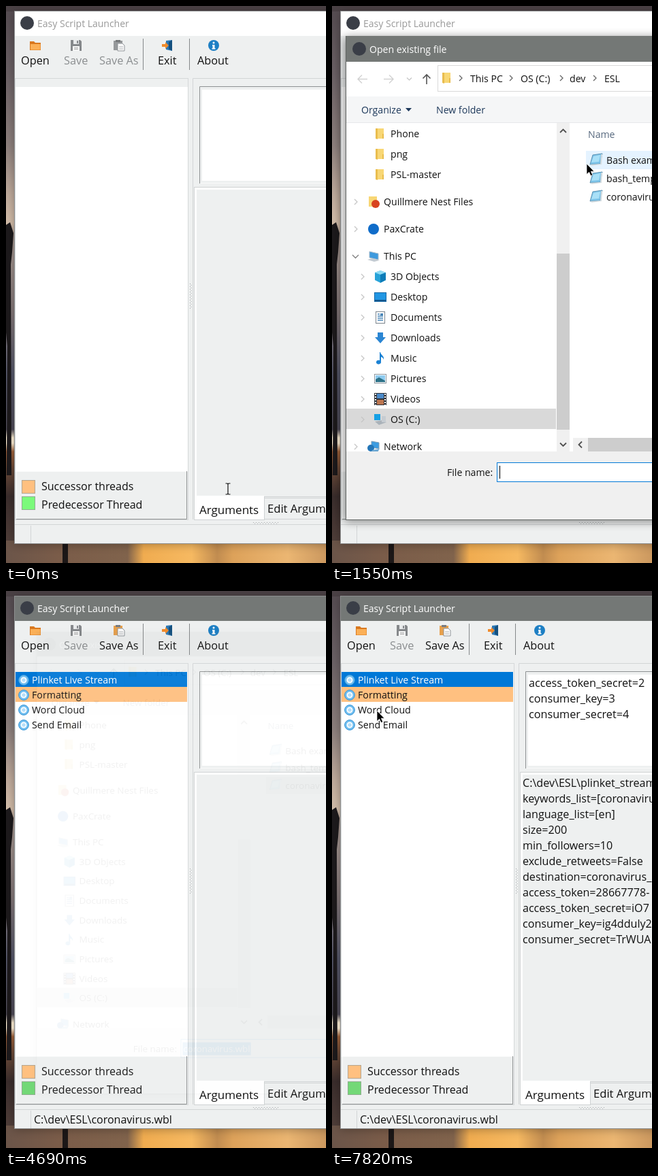
Animation, 470 px wide and 819 px high, one loop 7.99 s. Source, as an HTML page:

```html
<!DOCTYPE html>
<html lang="en">
<head>
<meta charset="utf-8">
<title>Script launcher</title>
<style>
  html, body { margin: 0; width: 100%; height: 100%; overflow: hidden; background: #3b3433; }
  svg { display: block; width: 470px; height: 819px; font-family: "Open Sans", "Noto Sans", sans-serif; }
</style>
</head>
<body>
<svg id="stage" viewBox="0 0 470 819"></svg>
<script>
const LOOP = 7990;
const OPEN_START = 1080, OPEN_DONE = 1230, PICK = 2650, CONFIRM = 4540, LOADED = 4690, CLOSED = 4860, SHOW_ARGS = 6420;

// Markup helpers
const rect = (x, y, w, h, fill, extra = '') => `<rect x="${x}" y="${y}" width="${w}" height="${h}" fill="${fill}" ${extra}/>`;
const box = (x, y, w, h, fill, stroke, extra = '') => rect(x + .5, y + .5, w - 1, h - 1, fill, `stroke="${stroke}" ${extra}`);
const text = (x, y, str, size = 16, fill = '#111', extra = '') => `<text x="${x}" y="${y}" font-size="${size}" fill="${fill}" ${extra}>${str}</text>`;
const path = (d, fill, extra = '') => `<path d="${d}" fill="${fill}" ${extra}/>`;
const line = (d, stroke, width = 1, extra = '') => path(d, 'none', `stroke="${stroke}" stroke-width="${width}" ${extra}`);
const disc = (x, y, r, fill, extra = '') => `<circle cx="${x}" cy="${y}" r="${r}" fill="${fill}" ${extra}/>`;
const group = (id, body, extra = '') => `<g id="${id}" ${extra}>${body}</g>`;
const at = (x, y, body) => `<g transform="translate(${x} ${y})">${body}</g>`;
const gradient = (id, attrs, stops) => `<linearGradient id="${id}" ${attrs}>` +
  stops.map(([offset, color]) => `<stop offset="${offset}" stop-color="${color}"/>`).join('') + '</linearGradient>';

// Icons are centred on 0,0
const floppy = path('M-8 -8H6L8 -6V8H-8Z', '#85888b') + rect(-4, -8, 8, 6, '#e8eaeb') + rect(1, -7, 2, 4, '#85888b') + rect(-5, 1, 10, 7, '#f4f5f5') + line('M-3 3.5H3M-3 5.5H3', '#aaa');
const paste = (board, clip) => rect(-8, -7, 13, 14, board) + rect(-5, -8, 7, 3, clip) + path('M-2 -3H5L8 0V8H-2Z', '#fafafa', 'stroke="#909599"') + line('M0 2H6M0 5H6', '#b0b4b8');
const icons = {
  open: path('M-8 -6H-2L0 -4H8V7H-8Z', '#d9781f') + path('M-7 -2H7.5V6.5H-7Z', '#fbb057'),
  exit: path('M-2 -7L7 -8V8L-2 6Z', '#2b78b5') + path('M2 -5L7 -8V8L2 5Z', '#14507f') + path('M-8 -2H-3V-5L2 0L-3 5V2H-8Z', '#f08b2c'),
  about: disc(0, 0, 8, '#1d7fc4') + disc(0, -4, 1.5, '#fff') + path('M-2 -1H1.5V4H2.5V5.5H-2.5V4H-1.5V.5H-2Z', '#fff'),
  thread: disc(0, 0, 7.4, '#72bff0', 'stroke="#3795d6"') + disc(0, 0, 3.6, '#b5def8', 'stroke="#fff" stroke-width="1.8"'),
  folder: path('M-6 -8H6V7H-6Z', '#f8d775') + path('M-6 -8H-3V8L-6 7Z', '#e9bd4e') + rect(4, 0, 2, 7, '#e9bd4e'),
  sync: path('M-7 -8H5V7H-7Z', '#f8d775') + disc(3, 3, 6, '#d8431f'),
  cloud: disc(0, 0, 8, '#0f6cc9'),
  pc: path('M-6 -7L7 -4V5L-6 2Z', '#3e9ade', 'stroke="#a9bccb"') + path('M-9 5L-2 3L9 6L1 8Z', '#c3cbd2'),
  cube: path('M0 -9L8 -6V5L0 9L-8 5V-6Z', '#28a3d9') + path('M0 -9L8 -6L0 -3L-8 -6Z', '#90dcf5') + path('M0 -3L8 -6V5L0 9Z', '#0d7cb8'),
  desktop: box(-9, -7, 18, 14, '#2196e3', '#1768a6') + rect(-8, 4, 16, 2, '#14578c'),
  doc: box(-7, -9, 14, 18, '#fff', '#7d868e') + line('M-4 -5H-1M-4 -2H4M-4 1H4M-4 4H4', '#4a86b8', 1.4) + rect(0, -6, 4, 3, '#4a86b8'),
  down: path('M-4 -8H4V-1H8L0 8L-8 -1H-4Z', '#2b86d3'),
  music: path('M0 -9C1 -4 6 -4 5 2C4 -1 2 -2 1 -2V5A3.6 3 0 1 1 -1 3V-9Z', '#1b82d4'),
  picture: box(-9, -7, 18, 14, '#fff', '#8a949c') + rect(-7, -5, 14, 10, '#8ecbf0') + path('M-7 5V1L-2 -2L7 3V5Z', '#2c7187'),
  video: rect(-9, -9, 18, 18, '#30343b') + rect(-5, -8, 10, 7, '#4b8ac9') + rect(-5, 1, 10, 7, '#bc7650') + line('M-7 -8V9M7 -8V9', '#fff', 2, 'stroke-dasharray="2 2"'),
  drive: rect(-9, -8, 9, 9, '#16a0e4') + path('M-8 3L3 1L9 4L-2 8Z', '#aab2b9') + path('M2 -5H8V4H2Z', '#c6ccd1'),
  network: path('M-3 -8L8 -6V3L-3 1Z', '#3c9ce1', 'stroke="#7f9db5"') + disc(-4, 2, 5, '#2476b8') + path('M-2 5L9 3L6 8H-3Z', '#6fa9d3'),
  note: path('M-5 -7L9 -9L6 6L-9 7Z', '#7cc3e8', 'stroke="#5d93b3"') + path('M-4 -5L6 -7L4 3L-7 4Z', '#a9e0f7') + path('M7 -8L9 -8L8 7L-7 9L-8 7L6 6Z', '#d5dde1'),
};

const scenery = () => `<defs>` +
  gradient('sky', 'x1="0" x2="0" y1="0" y2="1"', [[0, '#544b50'], [.12, '#6a6064'], [.25, '#8d807d'], [.34, '#c0ab9c'], [.39, '#d3bda9'], [.42, '#a99a93'], [.55, '#85797a'], [.66, '#56586b'], [.76, '#4f4b58'], [.775, '#fff0d6'], [.785, '#fff0d6'], [.8, '#a0623b'], [.83, '#6b4a38'], [.88, '#3a2d2c'], [1, '#5a4740']]) +
  gradient('shore', '', [[0, '#6b5549'], [.16, '#7a5c49'], [.38, '#80634c'], [.43, '#f0ac50'], [.58, '#f6b961'], [.66, '#c18c50'], [.71, '#dda25a'], [.88, '#ebb672'], [1, '#cb985f']]) +
  `<filter id="blur" x="-20%" y="-20%" width="140%" height="140%"><feGaussianBlur stdDeviation="7"/></filter></defs>` +
  rect(0, 0, 470, 819, 'url(#sky)') + rect(0, 0, 470, 8, '#4a4145') +
  path('M0 322L6 318L11 334L9 362L7 380L8 690H1L2 500L0 480Z', '#1d1a1c') +
  rect(0, 786, 470, 33, 'url(#shore)') + rect(83, 786, 8, 33, '#1c1717') +
  rect(12, 10, 600, 782, '#000', 'opacity=".3" filter="url(#blur)"');

const toolLabel = (x, label, fill) => text(x, 86, label, 16.3, fill);
const GREY = '#8b8e90';
const TASKS = ['Plinket Live Stream', 'Formatting', 'Word Cloud', 'Send Email'];
const EDITED = ['access_token_secret=2', 'consumer_key=3', 'consumer_secret=4'];
const ARGS = [String.raw`C:\dev\ESL\plinket_stream.py`, 'keywords_list=[coronavirus', 'language_list=[en]', 'size=200', 'min_followers=10',
  'exclude_retweets=False', 'destination=coronavirus_', 'access_token=28667778-', 'access_token_secret=iO7', 'consumer_key=ig4dduly2', 'consumer_secret=TrWUA'];

const launcher = () =>
  box(12, 7, 700, 784, '#eef0f0', '#8d8f90') +
  rect(13, 8, 460, 36, '#fff', 'id="titleBar"') +
  disc(31, 25, 10, '#3a3e47') + text(46, 31, 'Easy Script Launcher', 14, '#999', 'id="title"') +
  box(13, 46, 60, 49, '#d8e6f1', '#b4d6f0', 'id="openHover"') +
  at(43, 58, icons.open) + at(103, 58, floppy) + at(237, 58, icons.exit) + at(305, 58, icons.about) +
  toolLabel(22, 'Open') + toolLabel(85, 'Save', GREY) + toolLabel(223, 'Exit') + toolLabel(281, 'About') +
  line('M201.5 48V94M269.5 48V94', '#85888a') +
  group('saveAsOff', at(166, 58, paste('#96999b', '#75787a')) + toolLabel(137, 'Save As', GREY)) +
  group('saveAsOn', at(166, 58, paste('#e7a04c', '#777b80')) + toolLabel(137, 'Save As')) +
  // left dock
  box(13, 106, 255, 650, '#eef0f0', '#d5d8d9') + rect(14, 119, 253, 566, '#fff') +
  line('M15.5 754V684.5H266', '#fafafa') + line('M15 754.5H265.5V684', '#8f9293') +
  box(23, 697, 20, 20, '#ffc080', '#b5a58f') + box(23, 721, 20, 20, '#7bfa7b', '#8fae8f', 'id="green"') +
  text(52, 712, 'Successor threads') + text(52, 739, 'Predecessor Thread') +
  line('M270.5 408V445M272 410V445', '#a5a8aa', 1, 'stroke-dasharray="1 3"') +
  // right side
  line('M470 106.5H274.5V755', '#d2d5d6') +
  box(284, 118, 300, 143, '#eef0f0', '#f9f9f9') + line('M470 118.5H284.5V261', '#8e9192') + rect(288, 123, 200, 134, '#fff') +
  box(276, 266, 300, 456, '#fff', '#cfd2d3') + rect(280, 270, 200, 451, '#eef0f0') +
  line('M379 723.5H470', '#cfd2d3') +
  box(276, 721, 104, 35, '#fff', '#cfd2d3') + rect(277, 720, 102, 3, '#fff') +
  text(284, 747, 'Arguments', 17) + text(384, 745, 'Edit Arguments', 16.6) + line('M380 754.5H470', '#cfd2d3') +
  line('M363 759.5H400M365 761H400', '#a5a8aa', 1, 'stroke-dasharray="1 3"') +
  line('M13 762.5H470M36.5 764V790', '#d2d5d6') +
  group('loaded',
    rect(14, 119, 252, 22, '#0078d7') + rect(14, 141, 252, 22, '#ffc080') +
    TASKS.map((task, i) => at(26, 131 + 22 * i, icons.thread) + text(38, 136 + 22 * i, task, 14.2, i ? '#111' : '#fff')).join('') +
    text(41, 783, String.raw`C:\dev\ESL\coronavirus.wbl`)) +
  group('args',
    EDITED.map((s, i) => text(289, 141 + 23 * i, s, 16.2)).join('') +
    ARGS.map((s, i) => text(280, 288 + 23 * i, s, 16.1)).join(''));

// [icon, label, centre y, indent, has a chevron]
const PLACES = [
  ['folder', 'Phone', 188, 10], ['folder', 'png', 218, 10], ['folder', 'PSL-master', 248, 10],
  ['sync', 'Quillmere Nest Files', 288, 0, true], ['cloud', 'PaxCrate', 328, 0, true], ['pc', 'This PC', 368, 0],
  ...[['cube', '3D Objects'], ['desktop', 'Desktop'], ['doc', 'Documents'], ['down', 'Downloads'], ['music', 'Music'],
    ['picture', 'Pictures'], ['video', 'Videos'], ['drive', 'OS (C:)']].map(([icon, label], i) => [icon, label, 398 + 30 * i, 10, true]),
  ['network', 'Network', 648, 0, true],
];
const CRUMBS = [[189, 203, 'This PC'], [263, 277, 'OS (C:)'], [337, 349, 'dev'], [386, 400, 'ESL']];
const FILES = ['Bash example.wbl', 'bash_template.wbl', 'coronavirus.wbl'];
const small = (x, y, str, fill, extra) => text(x, y, str, 14.1, fill, extra);
const chevron = (x, y) => `M${x - 2} ${y - 4}l4 4l-4 4`;

const dialog = () =>
  rect(18, 46, 1094, 712, '#000', 'opacity=".45" filter="url(#blur)"') +
  box(20, 44, 1090, 712, '#fff', '#626664') + rect(21, 44, 1088, 38, '#747876') +
  disc(40, 63, 10, '#3a3e47') + small(55, 69, 'Open existing file', '#fff') +
  line('M52 107.5H38M44 101.5L38 107.5L44 113.5M76 107.5H90M84 101.5L90 107.5L84 113.5', '#d2d2d2', 1.4) +
  line('M110 105.5L113.5 109L117 105.5', '#c4c4c4', 1.2) + line('M139 115V101M133.5 106.5L139 101L144.5 106.5', '#555', 1.6) +
  box(155, 87, 700, 39, '#fff', '#d9d9d9') + at(168, 106, icons.folder) +
  CRUMBS.map(([arrow, x, label]) => line(chevron(arrow, 106), '#666', 1.3) + small(x, 112, label)).join('') +
  rect(21, 133, 1088, 38, '#f5f6f7') + line('M21 171.5H1109', '#e6e8ea') +
  small(43, 158, 'Organize', '#1e395b') + path('M108 150H117L112.5 155Z', '#1e395b') + small(153, 158, 'New folder', '#1e395b') +
  rect(21, 592, 308, 30, '#d9d9d9') +
  PLACES.map(([icon, label, y, indent]) => at(61 + indent - (icon === 'folder' ? 1 : 0), y, icons[icon]) + small(76 + indent, y + 5, label)).join('') +
  group('chevrons',
    PLACES.filter(p => p[4]).map(([, , y, indent]) => line(chevron(35 + indent, y), '#c3c3c3', 1.3)).join('') +
    line('M30 366L34.5 370.5L39 366', '#777', 1.3)) +
  rect(330, 172, 19, 483, '#f0f0f0') + rect(330, 364, 19, 259, '#cdcdcd') +
  line('M335 186L339.5 181.5L344 186M335 642.5L339.5 647L344 642.5', '#505050', 1.8) +
  small(376, 194, 'Name', '#55677d') +
  box(373, 213, 600, 27, '#e5f3ff', '#e5f3ff', 'id="rowHover"') + box(373, 267, 600, 27, '#cce8ff', '#99d1ff', 'id="rowPicked"') +
  FILES.map((name, i) => at(388, 226 + 27 * i, icons.note) + small(403, 232 + 27 * i, name)).join('') +
  rect(354, 635, 740, 20, '#f0f0f0') + rect(376, 635, 600, 20, '#cdcdcd') + line('M367 640.5L362.5 645L367 649.5', '#505050', 1.8) +
  rect(21, 655, 1088, 100, '#f0f0f0') + small(169, 691, 'File name:') +
  box(242, 671, 700, 29, '#fff', '#0078d7', 'id="field"') + line('M246.5 676V695', '#000', 1, 'id="caret"') +
  rect(245, 676, 105, 20, '#0078d7', 'id="fieldSelection"') + text(246, 691, 'coronavirus.wbl', 13.9, '#111', 'id="fileName"');

const pointers =
  group('arrow', path('M0 0V15.5L3.6 12.2L6 17.6L8.7 16.4L6.3 11.2H11Z', '#000', 'stroke="#fff" stroke-width=".7"')) +
  group('beam', line('M-3.5 -8H-1L0 -7L1 -8H3.5M0 -7V7M-3.5 8H-1L0 7L1 8H3.5', '#111', 1.2));

document.getElementById('stage').innerHTML = scenery() + launcher() + group('dialog', dialog()) + pointers;

const el = {};
document.querySelectorAll('#stage [id]').forEach(node => { el[node.id] = node; });
const show = (id, on) => { el[id].style.display = on ? '' : 'none'; };
const paint = (id, fill) => el[id].setAttribute('fill', fill);

// Pointer path: time, x, y
const ROUTE = [[0, 326, 710], [750, 43, 73], [1230, 43, 73], [1530, 374, 232], [2140, 404, 262], [2490, 408, 268], [2790, 415, 286],
  [3580, 415, 286], [4190, 485, 690], [4690, 485, 690], [5600, 490, 330], [6250, 29, 111], [6550, 45, 127], [6900, 45, 127], [7810, 66, 176]];
const RUNS = [0, 140, 1230, 2490, 3580, 4690, 5790, 6900];
const TICK = 153;

function recordedTime(t) {
  const start = RUNS.findLast(s => s <= t);
  return start + Math.min(6, Math.floor((t - start) / TICK)) * TICK;
}

function pointerAt(t) {
  const next = ROUTE.findIndex(key => key[0] > t);
  if (next < 0) return ROUTE.at(-1).slice(1);
  const [t0, x0, y0] = ROUTE[next - 1], [t1, x1, y1] = ROUTE[next];
  const u = (t - t0) / (t1 - t0), k = u * u * (3 - 2 * u);
  return [x0 + (x1 - x0) * k, y0 + (y1 - y0) * k];
}

function draw(t) {
  const tick = recordedTime(t);
  const [x, y] = pointerAt(tick);
  const dialogUp = t >= OPEN_START && t < CLOSED;
  const modal = t >= OPEN_START && t < LOADED;
  const loaded = t >= LOADED;
  const picked = t >= PICK, confirmed = t >= CONFIRM;

  paint('titleBar', loaded ? '#747876' : '#fff');
  paint('title', loaded ? '#fff' : '#999');
  paint('green', loaded ? '#73d877' : '#7bfa7b');
  show('openHover', !modal && x < 73 && y > 46 && y < 95);
  show('saveAsOff', !loaded);
  show('saveAsOn', loaded);
  show('loaded', loaded);
  show('args', t >= SHOW_ARGS);

  show('dialog', dialogUp);
  const [opacity, scale] = t < OPEN_DONE ? [.6, .97] : loaded ? [.05, .955] : [1, 1];
  el.dialog.setAttribute('opacity', opacity);
  el.dialog.setAttribute('transform', `translate(565 400) scale(${scale}) translate(-565 -400)`);
  el.chevrons.setAttribute('opacity', Math.max(0, Math.min(1, (2100 - tick) / 600)));

  const row = Math.floor((y - 213) / 27);
  show('rowHover', x >= 373 && row >= 0 && row < 3 && !(picked && row === 2));
  el.rowHover.setAttribute('y', 213.5 + 27 * row);
  show('rowPicked', picked);
  paint('rowPicked', confirmed ? '#d9d9d9' : '#cce8ff');
  el.rowPicked.setAttribute('stroke', confirmed ? '#d9d9d9' : '#99d1ff');
  el.field.setAttribute('stroke', picked && !confirmed ? '#7a7a7a' : '#0078d7');
  show('caret', !picked);
  show('fileName', picked);
  show('fieldSelection', confirmed);
  paint('fileName', confirmed ? '#fff' : '#111');

  const overText = modal ? x > 242 && y > 671 && y < 700 : x > 280 && y > 270 && y < 720;
  show('arrow', !overText);
  show('beam', overText);
  const place = `translate(${x.toFixed(1)} ${y.toFixed(1)})`;
  el.arrow.setAttribute('transform', place);
  el.beam.setAttribute('transform', place);
}

const began = performance.now();
function frame() {
  draw((performance.now() - began) % LOOP);
  requestAnimationFrame(frame);
}
frame();
</script>
</body>
</html>
```
